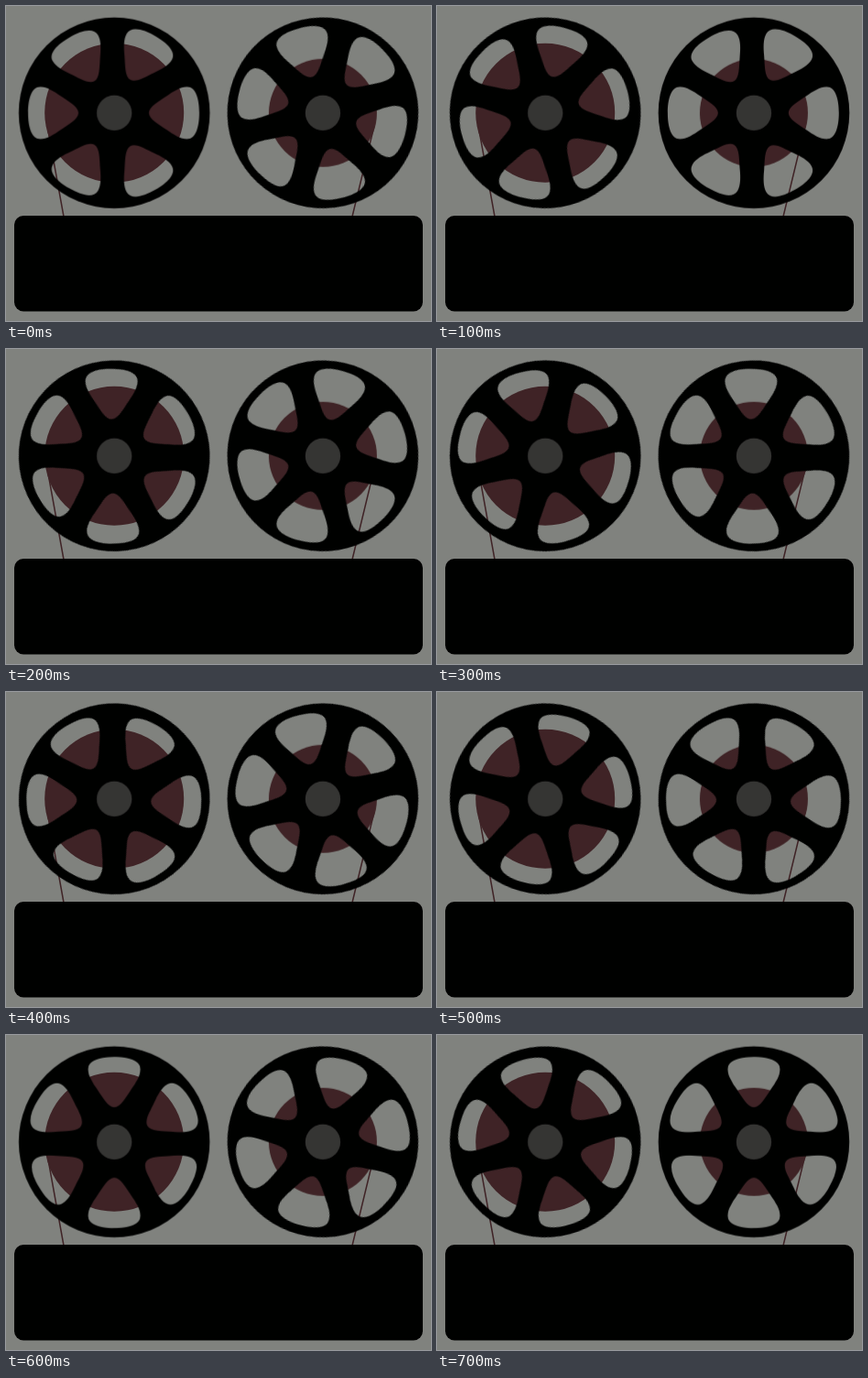
An HTML page for the animation above (0.8 s loop, 464 by 344 pixels).

```html
<!DOCTYPE html>
<html lang="en">
<head>
<meta charset="utf-8">
<title>Tape reels</title>
<style>
  html, body { margin: 0; width: 100%; height: 100%; overflow: hidden; background: #80827e; }
  svg { display: block; width: 464px; height: 344px; }
  .tape { fill: #3f2326; }
  .strand { stroke: #3f2326; stroke-width: 1.5; }
  .hub { fill: #353533; }
  .solid { fill: #000100; }
  .spin { animation: spin 800ms steps(8, end) infinite; transform-origin: 0 0; }
  @keyframes spin { to { transform: rotate(-120deg); } }
</style>
</head>
<body>
<svg viewBox="0 0 464 344">
  <defs>
    <path id="hole" d="M38.5 0C38.5 7 50 13 58 18.5C65 23.5 73 28.5 80 28.5C90 28.5 93.5 15 93.5 0C93.5 -15 90 -28.5 80 -28.5C73 -28.5 65 -23.5 58 -18.5C50 -13 38.5 -7 38.5 0Z"/>
    <!-- The windows sit slightly off a regular hexagon. -->
    <mask id="windows" maskUnits="userSpaceOnUse" x="-106" y="-106" width="212" height="212">
      <rect x="-106" y="-106" width="212" height="212" fill="#fff"/>
      <use href="#hole" transform="translate(-.7 0)"/>
      <use href="#hole" transform="rotate(60) translate(1.6 3)"/>
      <use href="#hole" transform="rotate(120) translate(2.4 1.4)"/>
      <use href="#hole" transform="rotate(180) translate(.6 0)"/>
      <use href="#hole" transform="rotate(240) translate(2.4 -1.4)"/>
      <use href="#hole" transform="rotate(300) translate(1.6 -3)"/>
    </mask>
    <g id="wheel">
      <circle class="solid" r="104.3" mask="url(#windows)"/>
    </g>
  </defs>

  <path class="strand" d="M46 136L63 230M402 131L378 230"/>

  <g transform="translate(118.2 116.7)">
    <circle class="tape" r="76"/>
    <g class="spin"><use href="#wheel"/></g>
    <circle class="hub" r="19.2"/>
  </g>

  <g transform="translate(345.9 116.7)">
    <circle class="tape" r="59"/>
    <g class="spin"><use href="#wheel" transform="rotate(15)"/></g>
    <circle class="hub" r="19.2"/>
  </g>

  <rect class="solid" x="9" y="229" width="446" height="104.5" rx="10"/>
</svg>
</body>
</html>
```
